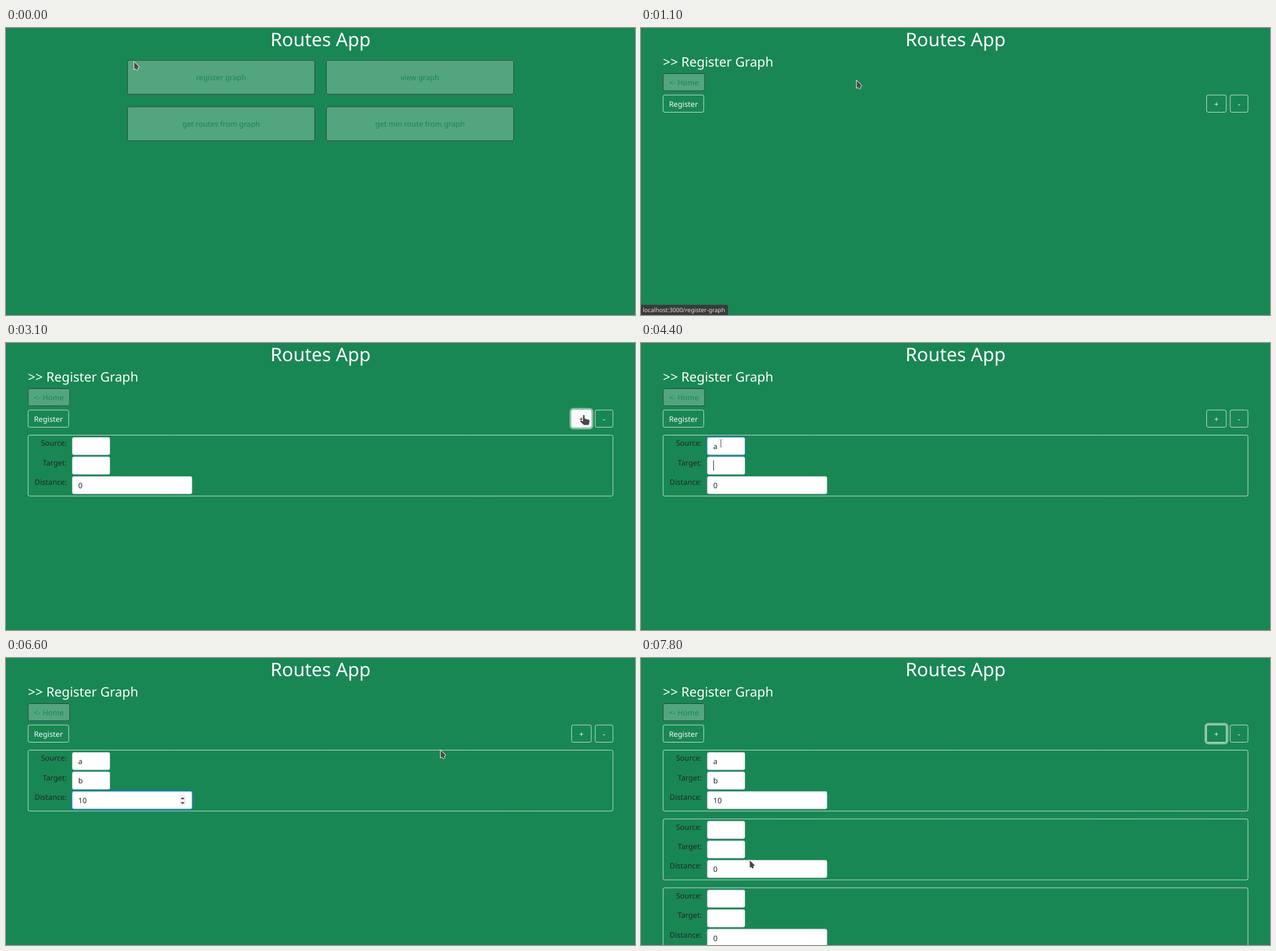
An HTML page with a canvas that plays this animation: 1106x506 px, repeating every 8000 ms.

```html
<!DOCTYPE html>
<html lang="en">
<head>
<meta charset="utf-8">
<title>Routes App</title>
<style>
html, body { margin: 0; width: 100%; height: 100%; overflow: hidden; background: #198754; }
canvas { display: block; width: 1106px; height: 506px; }
</style>
</head>
<body>
<canvas id="stage" width="1106" height="506"></canvas>
<script>
const ctx = document.getElementById('stage').getContext('2d');
const LOOP = 8000, STEP = 100;
const ZOOM = .82; // the page is laid out 1349 units wide
const GREEN = '#198754', DARK = '#212529', LIGHT = '#f8f9fa';

// Each track is a list of [time, value...]; a value holds until the next key.
const pointer = [
  [0, 'arrow', 224, 58], [100, 'arrow', 285, 35],
  [400, 'arrow', 300, 46], [500, 'hand', 320, 64], [600, 'hand', 342, 77],
  [700, 'hand', 360, 85], [800, 'hand', 370, 90], [900, 'hand', 373, 91],
  [1100, 'arrow', 378, 91], [1300, 'arrow', 345, 94], [1400, 'arrow', 290, 103],
  [1500, 'arrow', 230, 115], [1600, 'arrow', 170, 125], [1700, 'arrow', 122, 130],
  [1800, 'hand', 88, 129], [1900, 'hand', 78, 127], [2200, 'arrow', 471, 170],
  [2300, 'arrow', 650, 191], [2400, 'arrow', 830, 188], [2500, 'arrow', 980, 172],
  [2600, 'arrow', 1053, 152], [3000, 'hand', 1006, 125], [3300, 'arrow', 700, 212],
  [3400, 'arrow', 330, 223], [3500, 'beam', 148, 178], [3700, 'beam', 138, 170],
  [3800, 'none', 0, 0], [4000, 'beam', 138, 170], [6100, 'arrow', 372, 226],
  [6300, 'arrow', 385, 228], [6400, 'arrow', 184, 180], [6600, 'arrow', 763, 161],
  [6800, 'arrow', 880, 150], [6900, 'arrow', 960, 138], [7000, 'hand', 1000, 127],
  [7100, 'hand', 1006, 125], [7700, 'arrow', 620, 235], [7800, 'arrow', 190, 355]
];
const tracks = {
  registerFill: [[0, 0], [1800, .7], [1900, 1], [2200, .28], [2300, 0]],
  plusFill: [[0, 0], [3000, .7], [3100, 1], [3300, .3], [3400, 0], [7000, .7], [7100, 1], [7700, .3], [7800, 0]],
  plusRing: [[0, 0], [3000, .5], [3100, 1], [3700, .4], [3800, 0], [7300, .3], [7500, 1]],
  sourceRing: [[0, 0], [3700, .5], [3800, 1], [4400, .85], [4600, 0]],
  targetRing: [[0, 0], [4600, 1], [4800, .4], [5000, 0]],
  distanceRing: [[0, 0], [4800, .5], [5000, 1], [7300, .15], [7500, 0]],
  rows: [[0, 0], [3100, 1], [7500, 2], [7600, 3]],
  source: [[0, ''], [4200, 'a']],
  target: [[0, ''], [4600, 'b']],
  distance: [[0, '0'], [5700, '1'], [5800, '10']],
  caret: [[0, ''], [3800, 'source'], [4400, 'target'], [4800, ''], [5700, 'distance'],
    [6300, ''], [6800, 'distance'], [7300, '']]
};

function keyAt(keys, t) {
  let key = keys[0];
  for (const k of keys) if (k[0] <= t) key = k;
  return key;
}
const between = (t, a, b) => t >= a && t < b;

// Border box: the one-unit border lies inside the given size
function box(x, y, w, h, fill, border, r = 4) {
  if (fill) {
    ctx.beginPath();
    ctx.roundRect(x, y, w, h, r);
    ctx.fillStyle = fill;
    ctx.fill();
  }
  if (border) {
    ctx.beginPath();
    ctx.roundRect(x + .5, y + .5, w - 1, h - 1, r - .5);
    ctx.strokeStyle = border;
    ctx.lineWidth = 1;
    ctx.stroke();
  }
}

// top is the upper edge of the line box
function text(str, x, top, color, align = 'center', size = 16) {
  const ascent = Math.round(size * 1.069), descent = Math.round(size * .293);
  const line = size * (size > 16 ? 1.2 : 1.5);
  ctx.font = `${size}px "Noto Sans", "Open Sans", sans-serif`;
  ctx.textRendering = 'geometricPrecision';
  ctx.textAlign = align;
  ctx.fillStyle = color;
  ctx.fillText(str, x, Math.round(top + ascent + Math.floor((line - ascent - descent) / 2)));
}

// Focus glow: a band that grows outwards from the edge
function ring(x, y, w, h, level, rgb, alpha) {
  if (!level) return;
  const d = 4 * level;
  ctx.beginPath();
  ctx.roundRect(x - d, y - d, w + 2 * d, h + 2 * d, 4 + d);
  ctx.roundRect(x, y, w, h, 4);
  ctx.fillStyle = `rgba(${rgb},${alpha * level})`;
  ctx.fill('evenodd');
}

function mix(a, b, k) {
  return `rgb(${a.map((v, i) => Math.round(v + (b[i] - v) * k))})`;
}

function outlineButton(label, x, w, fill = 0, glow = 0) {
  const y = 143.6, h = 38;
  ring(x, y, w, h, glow, '248,249,250', .5);
  box(x, y, w, h, `rgba(248,249,250,${fill})`, LIGHT);
  text(label, x + w / 2, y + 7, mix([248, 249, 250], [0, 0, 0], fill));
}

function linkButton(label, x, y, w, h, color = GREEN) {
  box(x, y, w, h, 'rgba(255,255,255,.25)', DARK);
  text(label, x + w / 2, y + h / 2 - 12, color);
}

function field(label, value, y, w, glow, caret, selected) {
  const x = 142, h = 38, inner = x + 13;
  text(label, 130.5, y, DARK, 'right');
  ring(x, y, w, h, glow, '13,110,253', .25);
  box(x, y, w, h, '#fff', mix([206, 212, 218], [134, 183, 254], Math.min(1, glow * 3)));
  if (selected) {
    ctx.fillStyle = '#3daee9';
    ctx.fillRect(inner, y + 8, 9.2, 22);
  }
  text(value, inner, y + 7, selected ? '#fff' : DARK, 'left');
  if (caret) {
    ctx.fillStyle = '#111';
    ctx.fillRect(inner + ctx.measureText(value).width, y + 8, 1.2, 22);
  }
}

function spinner() {
  box(372, 295, 13.5, 22, '#efeff0', null, 2);
  ctx.fillStyle = '#3c3c3c';
  for (const [y, d] of [[303.5, -4], [310, 4]]) {
    ctx.beginPath();
    ctx.moveTo(374.5, y);
    ctx.lineTo(383, y);
    ctx.lineTo(378.75, y + d);
    ctx.fill();
  }
}

const shapes = {
  arrow: new Path2D('M.8 .8V15.2L3.6 14L6.4 17L8.8 14.6L7.6 12.6L10.6 10.6Z'),
  hand: new Path2D('M8 3Q10 -.5 12 3V8L19 10Q21 11 20.5 13.5L19 20H10L3.2 13.5Q3.5 10 6.5 11.5L8 13Z'),
  beam: new Path2D('M.5 .5H1.5L2.5 1.5L3.5 .5H4.5M2.5 1.5V12.5M.5 13.5H1.5L2.5 12.5L3.5 13.5H4.5')
};

function drawPointer([, kind, x, y]) {
  const shape = shapes[kind];
  if (!shape) return;
  ctx.save();
  ctx.translate(x, y);
  ctx.lineWidth = 1;
  ctx.lineJoin = 'round';
  if (kind === 'beam') {
    ctx.strokeStyle = '#444';
  } else {
    ctx.fillStyle = '#4b484b';
    ctx.fill(shape);
    ctx.strokeStyle = '#fff';
  }
  ctx.stroke(shape);
  ctx.restore();
}

function homePage(hover) {
  const labels = ['register graph', 'view graph', 'get routes from graph', 'get min route from graph'];
  labels.forEach((label, i) => linkButton(label,
    i % 2 ? 686.5 : 260, i < 2 ? 69 : 169, 402.5, 74, hover && !i ? '#146c43' : GREEN));
}

function registerPage(t, s) {
  text('>> Register Graph', 47, 56, '#fff', 'left', 28);
  linkButton('<- Home', 47, 97.6, 90, 38);
  outlineButton('Register', 47, 88, s.registerFill);
  outlineButton('+', 1212.4, 43, s.plusFill, s.plusRing);
  outlineButton('-', 1263, 39);
  for (let i = 0; i < s.rows; i++) {
    const top = 197.6 + 148 * i, first = i === 0;
    const add = (name, y, w, empty) => field(
      name[0].toUpperCase() + name.slice(1) + ':', first ? s[name] : empty, top + y, w,
      first ? s[name + 'Ring'] : 0, first && s.caret === name,
      first && name === 'distance' && between(t, 4800, 5700));
    box(47, top, 1255, 132, null, LIGHT);
    add('source', 5, 81, '');
    add('target', 47, 81, '');
    add('distance', 89, 257, '0');
  }
  if (between(t, 4800, 7300)) spinner();
}

function statusBar() {
  box(0, 595, 186.5, 23, '#3a3a3b', null, [0, 4, 0, 0]);
  text('localhost:3000/register-graph', 3.7, 597, '#e2e2e2', 'left', 12.7);
}

function draw(t) {
  const s = {};
  for (const name in tracks) s[name] = keyAt(tracks[name], t)[1];
  ctx.fillStyle = GREEN;
  ctx.fillRect(0, 0, 1106, 506);
  ctx.save();
  ctx.scale(ZOOM, ZOOM);
  text('Routes App', 674.5, 0, '#fff', 'center', 40);
  if (t < 1100) homePage(t >= 500);
  else registerPage(t, s);
  if (between(t, 500, 1300)) statusBar();
  ctx.restore();
  drawPointer(keyAt(pointer, t));
}

function tick() {
  const t = performance.now() % LOOP;
  draw(Math.floor(t / STEP) * STEP);
  requestAnimationFrame(tick);
}
tick();
</script>
</body>
</html>
```
